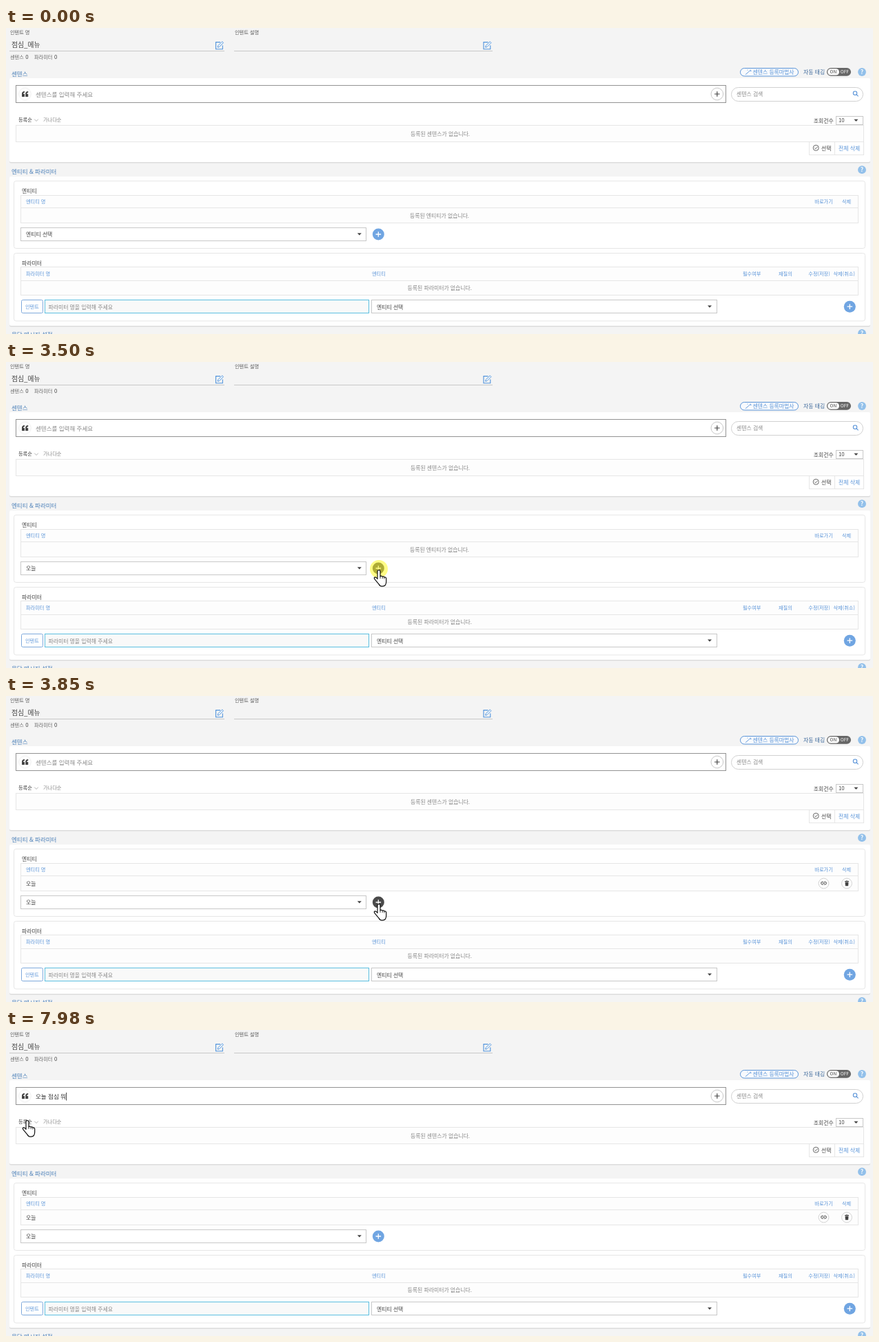
Recreate the animation shown at these times as an HTML page. Size 1258 by 445 pixels, loop 8000 ms.

```html
<!DOCTYPE html>
<html lang="ko">
<head>
<meta charset="utf-8">
<title>인텐트 편집</title>
<style>
html, body { margin: 0; width: 100%; height: 100%; overflow: hidden; background: #f4f4f4; }
svg { display: block; width: 1258px; height: 445px; }
text { font-family: "Noto Sans CJK KR", "Noto Sans CJK", "Noto Sans", sans-serif; white-space: pre; }
</style>
</head>
<body>
<svg id="stage" viewBox="0 0 1258 445" xmlns="http://www.w3.org/2000/svg"></svg>
<script>
const LOOP = 8000;
const S = 7.2, M = 7.86, L = 8.52, XL = 9.83;
const DARK = '#444', GREY = '#888', BLUE = '#5a94d8', HEAD = '#4a7fb8', LINE = '#e6e6e6', EDGE = '#c8c8c8';

// ---- drawing helpers; text is placed by its vertical centre ----
const text = (x, cy, size, str, fill = DARK, extra = '') =>
  `<text x="${x}" y="${(cy + size * 0.37).toFixed(2)}" font-size="${size}" fill="${fill}" ${extra}>${str}</text>`;
const mid = (x, cy, size, str, fill = GREY) => text(x, cy, size, str, fill, 'text-anchor="middle"');
const box = (x1, y1, x2, y2, fill = '#fff', stroke = LINE, r = 0, extra = '') =>
  `<rect x="${x1}" y="${y1}" width="${x2 - x1}" height="${y2 - y1}" rx="${r}" fill="${fill}" stroke="${stroke}" ${extra}/>`;
const line = (x1, y1, x2, y2, stroke = LINE, w = 1) =>
  `<path d="M${x1} ${y1}L${x2} ${y2}" stroke="${stroke}" stroke-width="${w}"/>`;
const disc = (x, y, r, fill, stroke = 'none', extra = '') =>
  `<circle cx="${x}" cy="${y}" r="${r}" fill="${fill}" stroke="${stroke}" ${extra}/>`;
const shape = (x, y, d, fill, stroke = 'none', w = 1, extra = '') =>
  `<path transform="translate(${x} ${y})" d="${d}" fill="${fill}" stroke="${stroke}" stroke-width="${w}" ${extra}/>`;
const group = (id, inner, extra = '') => `<g id="${id}" ${extra}>${inner}</g>`;

const plus = (x, y, stroke, r = 3.8, w = 1.3) => shape(x, y, `M${-r} 0H${r}M0 ${-r}V${r}`, 'none', stroke, w);
const addButton = (x, y, id = '') => disc(x, y, 8.5, '#70a5e2', 'none', id && `id="${id}"`) + plus(x, y, '#fff');
const caret = (x, y, extra = '') => shape(x, y, 'M-3 -1.5H3L0 1.7z', '#444', 'none', 1, extra);
const help = (x, y) => disc(x, y, 5.9, '#92c0ea') +
  text(x, y, 8.5, '?', '#fff', 'text-anchor="middle" font-weight="700"');
const editIcon = (x, y) =>
  shape(x, y, 'M1.5 -4.7H-5V5.4H4.8V0', 'none', '#4f93dc', 1.1) +
  shape(x, y, 'M-2.4 2.8L-1.8 .4 4.2 -5.6 6 -3.8 0 2.2z', '#eaf3fc', '#4f93dc', .9);
const panel = (y1, y2) => box(5, y1 + 1, 1254, y2 + 1.5, '#dcdcdc', 'none', 2) + box(5, y1, 1254, y2, '#fff', 'none', 2);
const card = (y1, y2) => box(11.5, y1, 1246.5, y2, '#fff', LINE, 3);

function header() {
  return text(6, 6.5, S, '인텐트 명', '#555') + text(332, 6.5, S, '인텐트 설명', '#555') +
    text(8, 24.5, XL, '점심_메뉴') + line(5, 33.5, 317, 33.5, EDGE) + line(331, 33.5, 706, 33.5, EDGE) +
    editIcon(309.5, 25.3) + editIcon(698, 25.3) +
    text(6, 42.5, S, '센텐스', '#666') + text(28.3, 42.3, M, '0') +
    text(41, 42.5, S, '파라미터', '#666') + text(70, 42.3, M, '0');
}

function sentences() {
  const quote = 'M0 8V3.6Q0 0 4 0V1.7Q2.1 1.9 2.1 4H4V8z';
  return text(8, 66.5, L, '센텐스', HEAD) +
    box(1065.5, 58.5, 1149.5, 70, '#f8fafd', BLUE, 5.8) +
    shape(1077, 64.5, 'M-4 3.2L2 -2M3 -4v2M4.5 -2h-2M-1 -4v1', 'none', BLUE, .9) +
    text(1083.5, 64.3, M, '센텐스 등록마법사', BLUE) +
    text(1157, 64.3, M, '자동 태깅', '#3f6a9c') +
    box(1191, 58, 1226, 69.8, '#666', 'none', 5.9) + box(1192.2, 59.2, 1209, 68.6, '#fff', 'none', 4.7) +
    text(1195.6, 64, 6.55, 'ON') + text(1210.8, 64, 6.55, 'OFF', '#fff') + help(1242, 64) +
    panel(73, 195) +
    box(14.5, 83.5, 1044.5, 108.5, '#fff', '#939393') + disc(27.5, 96, 8.8, '#fff', '#f0f0f0') +
    shape(23, 92, quote, '#444') + shape(28.2, 92, quote, '#444') +
    text(43, 96.8, L, '센텐스를 입력해 주세요', GREY, 'id="hint"') +
    text(43, 96.8, L, '', '#333', 'id="typed"') +
    shape(0, 91, 'M0 0V11.5', 'none', '#222', .9, 'id="bar"') +
    disc(1031.8, 96, 8.8, '#fff', EDGE) + plus(1031.8, 96, '#444', 3.8, 1.2) +
    box(1052.5, 86.5, 1243.5, 106.5, '#fff', '#d0d0d0', 10) + text(1060, 96, M, '센텐스 검색', GREY) +
    shape(1232, 94.7, 'M2.7 0A2.7 2.7 0 1 1 -2.7 0 2.7 2.7 0 1 1 2.7 0M2 2L4.6 4.6', 'none', BLUE, 1.1) +
    text(18, 133.8, S, '등록순') + shape(44, 134, 'M-2.8 -1.4L0 1.5 2.8 -1.4', 'none', '#aaa', .9) +
    text(54, 133.8, S, '가나다순', GREY) +
    text(1171.8, 134.6, M, '조회건수') + box(1204.5, 128.5, 1243.5, 140.5, '#fff', EDGE) +
    text(1208, 134.4, M, '10') + caret(1233.4, 134.3) +
    box(14.5, 141.5, 1244.5, 165.5, '#fdfdfd') + mid(630, 153.8, M, '등록된 센텐스가 없습니다.') +
    box(1165.5, 165.5, 1244.5, 184.5) + line(1202.5, 165.5, 1202.5, 184.5) +
    disc(1175.2, 174.3, 4, '#fff', '#555', 'stroke-width=".9"') +
    shape(1175.2, 174.3, 'M-1.9 0L-.4 1.5 2.2 -1.4', 'none', '#555', .9) +
    text(1183, 174.6, M, '선택') + text(1208, 174.6, M, '전체 삭제', BLUE);
}

function entities() {
  const row = text(29, 272.8, M, '오늘') +
    disc(1186.5, 272.5, 7.4, '#fff', '#d2d2d2') +
    shape(1186.5, 272.2, 'M-.5 -1.9H-2A1.9 1.9 0 0 0 -2 1.9H-.5M.5 -1.9H2A1.9 1.9 0 0 1 2 1.9H.5M-1.7 0H1.7', 'none', '#444', 1) +
    disc(1220, 272.5, 7.4, '#fff', '#d2d2d2') +
    shape(1220, 272.5, 'M-3 -2.6V-3.4H-1V-4.1H1V-3.4H3V-2.6zM-2.5 -2H2.5L2.1 3.8H-2.1z', '#444');
  return text(8, 208.5, L, '엔티티 &amp; 파라미터', HEAD) + help(1242, 206.2) + panel(216, 433) +
    card(222.5, 320.5) + text(23, 236.8, M, '엔티티') +
    box(21.5, 243.5, 1236.5, 283.5, '#fdfdfd') + line(22, 261.5, 1236, 261.5) +
    text(29, 252.3, S, '엔티티 명', BLUE) + text(1173.3, 252.3, S, '바로가기', BLUE) +
    text(1213, 252.3, S, '삭제', BLUE) +
    group('empty', mid(629, 272.8, M, '등록된 엔티티가 없습니다.')) + group('row', row) +
    box(21.5, 290.5, 522.5, 309.5, '#fff', EDGE) + text(29, 300.5, M, '', DARK, 'id="choice"') +
    caret(512.8, 299.8, 'id="arrow"') + addButton(540.3, 300, 'add');
}

function parameters() {
  const heads = [[29, '파라미터 명'], [531, '엔티티'], [1069, '필수여부'], [1121, '재질의'], [1164.3, '수정(저장)'], [1200.5, '삭제(취소)']];
  return card(327.5, 426) + text(23, 342, M, '파라미터') +
    box(21.5, 347.5, 1236.5, 388.5, '#fdfdfd') + line(22, 367.5, 1236, 367.5) +
    heads.map(([x, s]) => text(x, 357.3, S, s, BLUE)).join('') +
    mid(629.3, 378, M, '등록된 파라미터가 없습니다.') +
    box(22.5, 395.5, 53.5, 414.5, '#fff', '#7ea9dc', 2) + text(28, 405.4, S, '인텐트', BLUE) +
    box(56.5, 395.5, 526.5, 414.5, '#f9f9f9', '#5bbfe0') + text(61.5, 406, M, '파라미터 명을 입력해 주세요', GREY) +
    box(530.5, 395.5, 1031.5, 414.5, '#fff', EDGE) + text(538, 405.6, M, '엔티티 선택') + caret(1021, 405) +
    addButton(1224.3, 405.2) + text(8, 446, L, '응답 메시지 설정', HEAD) + help(1242, 444);
}

const ITEMS = ['System.any', 'System.날짜', 'System.숫자', 'System.시간', '오늘'];
const itemY = i => 340.4 + i * 18.2;
function dropdown() {
  return box(21.5, 309.5, 522.5, 450, '#fff', EDGE) +
    box(22.5, 310.5, 521.5, 330.5, '#fff', '#6b9fdc') + text(27, 320.6, M, '목록 검색', GREY) +
    line(27.5, 315.5, 27.5, 326, '#333', .9) +
    ITEMS.map((s, i) => text(29, itemY(i), M, s, DARK, 'class="item"') +
      (i < 4 ? line(23, itemY(i) + 8.9, 522, itemY(i) + 8.9, '#eee') : '')).join('') +
    line(23, 444.5, 522, 444.5, '#e4e4e4');
}

function pointers() {
  const hand = 'M-2 2.3a2 2 0 0 1 4 0v7.2q1.2-1.6 3.2 .4q1.5-1 2.7 .8q2.4-.6 2.8 1.8v4.5q0 6.8-5.2 6.8h-1.5' +
    'q-2.4 0-4-3l-6.2-7.4q-1.4-2.4 .9-2.8q1.5 0 3.3 2.6z';
  return group('hand', shape(0, .3, hand, '#fff', '#111', 1.2, 'stroke-linejoin="round"') +
      shape(0, 0, 'M2 9.5v3.5M5.2 10.2v3M7.9 11v2.6', 'none', '#111', .8)) +
    group('point', shape(0, 0, 'M0 0V17.3l3.9-3.7 2.8 6.2 2.9-1.3-2.8-6h5.4z', '#fff', '#111', 1)) +
    group('beam', shape(0, 0, 'M-4.3 -8H-1.2L0 -7 1.2 -8H4.3M0 -7V7M-4.3 8H-1.2L0 7 1.2 8H4.3', 'none', '#111', 1.7));
}

const stage = document.getElementById('stage');
stage.innerHTML = box(0, 0, 1258, 445, '#f4f4f4', 'none') + header() + sentences() + entities() + parameters() +
  group('list', dropdown()) +
  group('busy', box(0, 0, 1258, 445, 'rgba(70,70,70,.75)', 'none') +
    disc(537.8, 228.7, 2.4, '#f6dc4e') + disc(544.5, 228.7, 3.1, '#f6dc4e') + disc(551.3, 228.7, 2.4, '#f6dc4e') +
    text(568, 228.5, XL, '진행중입니다.', '#fff', 'font-weight="500"')) +
  disc(0, 0, 13, 'rgba(255,250,40,.56)', 'none', 'id="glow"') + group('cursor', pointers());

const $ = id => document.getElementById(id);
const ui = {};
for (const id of ['hint', 'typed', 'bar', 'empty', 'row', 'choice', 'arrow', 'add', 'list', 'busy', 'glow', 'cursor', 'hand', 'point', 'beam'])
  ui[id] = $(id);
const items = [...stage.querySelectorAll('.item')];
const show = (el, on) => el.setAttribute('visibility', on ? 'visible' : 'hidden');
const within = (t, a, b) => t >= a && t < b;

// start, end, steps, from, bend, to
const MOVES = [
  [326, 1060, 12, [720, 470], [441, 350], [512, 303.5]],
  [1590, 2130, 9, [512, 303.5], [390, 320], [363, 408]],
  [2680, 3300, 10, [363, 408], [495, 303], [541, 302]],
  [4300, 5110, 13, [541, 302], [75, -115], [60, 100.5]],
  [5580, 5850, 5, [60, 100.5], [60, 114], [31, 131]]
];
const CLICKS = [[1320, 1450, 512, 303], [2480, 2610, 363, 408], [3500, 3640, 541, 301], [5310, 5440, 58.5, 99.5]];
const KEYS = [[6100, 'ㅇ'], [6170, '오'], [6390, '오ㄴ'], [6490, '오느'], [6600, '오늘'], [6700, '오늘 '],
  [6840, '오늘 ㅈ'], [6990, '오늘 저'], [7040, '오늘 점'], [7260, '오늘 점ㅅ'], [7300, '오늘 점시'],
  [7440, '오늘 점심'], [7660, '오늘 점심 '], [7840, '오늘 점심 ㅁ'], [7980, '오늘 점심 뭐']];

// the pointer advances in even steps along an eased curve
function position(t) {
  const move = MOVES.filter(m => t >= m[0]).pop();
  if (!move) return null;
  const [a, b, n, from, bend, to] = move;
  const k = t >= b ? n : Math.floor((t - a) / (b - a) * (n - 1) + 1e-6) + 1;
  const p = (1 - Math.cos(Math.PI * k / n)) / 2, q = 1 - p;
  return from.map((v, i) => q * q * v + 2 * p * q * bend[i] + p * p * to[i]);
}

const overAdd = (x, y) => Math.hypot(x - 540.3, y - 300) < 9;

function pointerKind(x, y, open) {
  if (within(y, 83, 108.5) && within(x, 15, 1020)) return 'beam';
  const onSelect = within(x, 22, 523) && within(y, 290, open ? 445 : 310);
  const onSort = within(x, 18, 48) && within(y, 128, 140);
  return onSelect || overAdd(x, y) || onSort ? 'hand' : 'point';
}

function render(t) {
  const open = within(t, 1390, 2610), busy = within(t, 3570, 3850), added = t >= 3850;
  const pos = position(t);
  show(ui.list, open);
  show(ui.busy, busy);
  ui.busy.setAttribute('opacity', Math.min(1, Math.max(0, (t - 3570) / 130)).toFixed(2));
  show(ui.row, added);
  show(ui.empty, !added);
  ui.choice.textContent = t < 2610 ? '엔티티 선택' : '오늘';
  ui.arrow.setAttribute('transform', `translate(512.8 299.8) scale(1 ${open ? -1 : 1})`);

  const kind = pos && pointerKind(pos[0], pos[1], open);
  show(ui.cursor, !!pos);
  for (const k of ['hand', 'point', 'beam']) show(ui[k], k === kind);
  if (pos) ui.cursor.setAttribute('transform', `translate(${pos[0].toFixed(2)} ${pos[1].toFixed(2)})`);

  const hover = pos && !within(t, 3640, 3850) && overAdd(...pos);
  ui.add.setAttribute('fill', hover ? '#4a4a4a' : '#70a5e2');
  items.forEach((el, i) => {
    const on = pos && Math.abs(pos[1] - itemY(i)) < 9.1;
    el.setAttribute('fill', on ? BLUE : DARK);
  });

  const click = CLICKS.find(c => within(t, c[0], c[1]));
  show(ui.glow, !!click);
  if (click) ui.glow.setAttribute('transform', `translate(${click[2]} ${click[3]})`);

  const key = KEYS.filter(k => t >= k[0]).pop();
  const str = key ? key[1].replace(/ /g, '\u00a0') : '';
  ui.typed.textContent = str;
  show(ui.hint, !key);
  show(ui.bar, t >= 5440);
  const end = str ? 43.7 + ui.typed.getComputedTextLength() : 43.3;
  ui.bar.setAttribute('transform', `translate(${end.toFixed(2)} 91)`);
}

const began = performance.now();
function tick() {
  render((performance.now() - began) % LOOP);
  requestAnimationFrame(tick);
}
tick();
</script>
</body>
</html>
```
